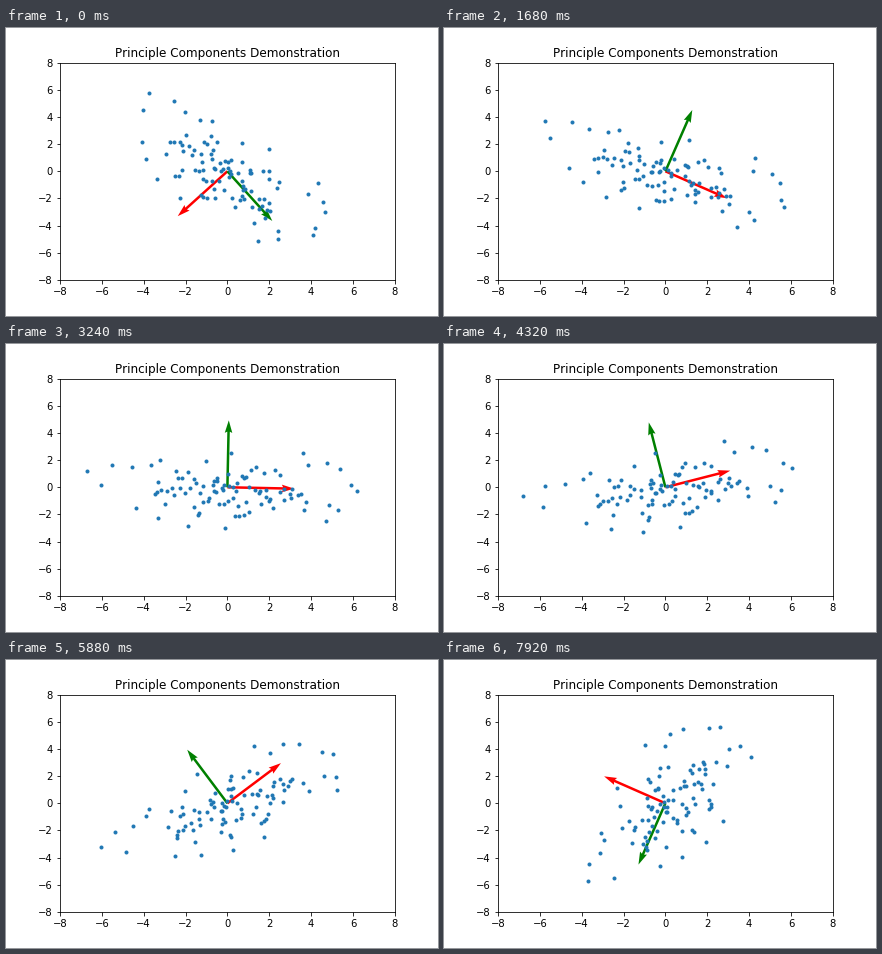
Animation of 432 by 288 pixels, one loop 8 s. Source, as a matplotlib script:

```python
import numpy as np
import matplotlib.pyplot as plt
from matplotlib.animation import FuncAnimation

TICK = 40                  # ms per animation frame
HOLD = 3                   # frames between rotation steps
FRAMES = 200
TURN = np.radians(1.73)    # rotation per step
START = np.radians(-47.9)  # initial direction of the major axis

# Outermost points, measured along the major and minor axes
RIM = np.array([
    (-6.75, 1.08), (-6.05, 0.03), (-5.54, 1.54), (-4.60, 1.40),
    (-4.34, -1.60), (-3.28, -2.30), (-3.24, 1.92), (-1.83, -2.90),
    (-0.07, -3.02), (0.12, 2.56), (3.54, 2.62), (4.74, 1.86),
    (5.34, 1.43), (5.90, 0.31), (6.22, -0.13), (5.32, -1.56),
    (4.78, -2.37), (4.88, -1.17),
])


def inner_points(count=80):
    """Even spread along the major axis, normal spread across it."""
    rng = np.random.default_rng(7)
    t = np.linspace(-1, 1, count)
    along = 0.1 + t * (2.6 + 1.2 * t**2) + rng.uniform(-0.1, 0.1, count)
    across = np.clip(rng.normal(-0.1, 1.1, count), -2.1, 1.9)
    return np.column_stack([along, across])


def rotate(points, angle):
    c, s = np.cos(angle), np.sin(angle)
    return points @ np.array([[c, s], [-s, c]])


def components(major):
    """Directions of both eigenvectors; they trade places past 45 degrees."""
    first = major
    if abs(major) > np.pi / 4:
        first += np.copysign(np.pi / 2, major)
    angles = np.array([first, first + np.pi / 2])
    return np.cos(angles), np.sin(angles)


cloud = np.vstack([RIM, inner_points()])

plt.rcParams["text.kerning_factor"] = 6
fig = plt.figure(figsize=(6, 4), dpi=72, facecolor="white")
fig.subplots_adjust(left=0.125, right=0.9, bottom=0.125, top=0.88)
ax = fig.add_subplot()
ax.set(xlim=(-8, 8), ylim=(-8, 8),
       xticks=range(-8, 9, 2), yticks=range(-8, 9, 2))
ax.set_title("Principle Components Demonstration", fontsize=12)

dots, = ax.plot([], [], ".", color="C0")
arrows = ax.quiver([0, 0], [0, 0], *components(START),
                   color=["red", "green"], scale=5)


def update(frame):
    major = START + TURN * (frame // HOLD)
    dots.set_data(*rotate(cloud, major).T)
    arrows.set_UVC(*components(major))
    return dots, arrows


anim = FuncAnimation(fig, update, frames=FRAMES, interval=TICK,
                     repeat=True, repeat_delay=0)
plt.show()
```
